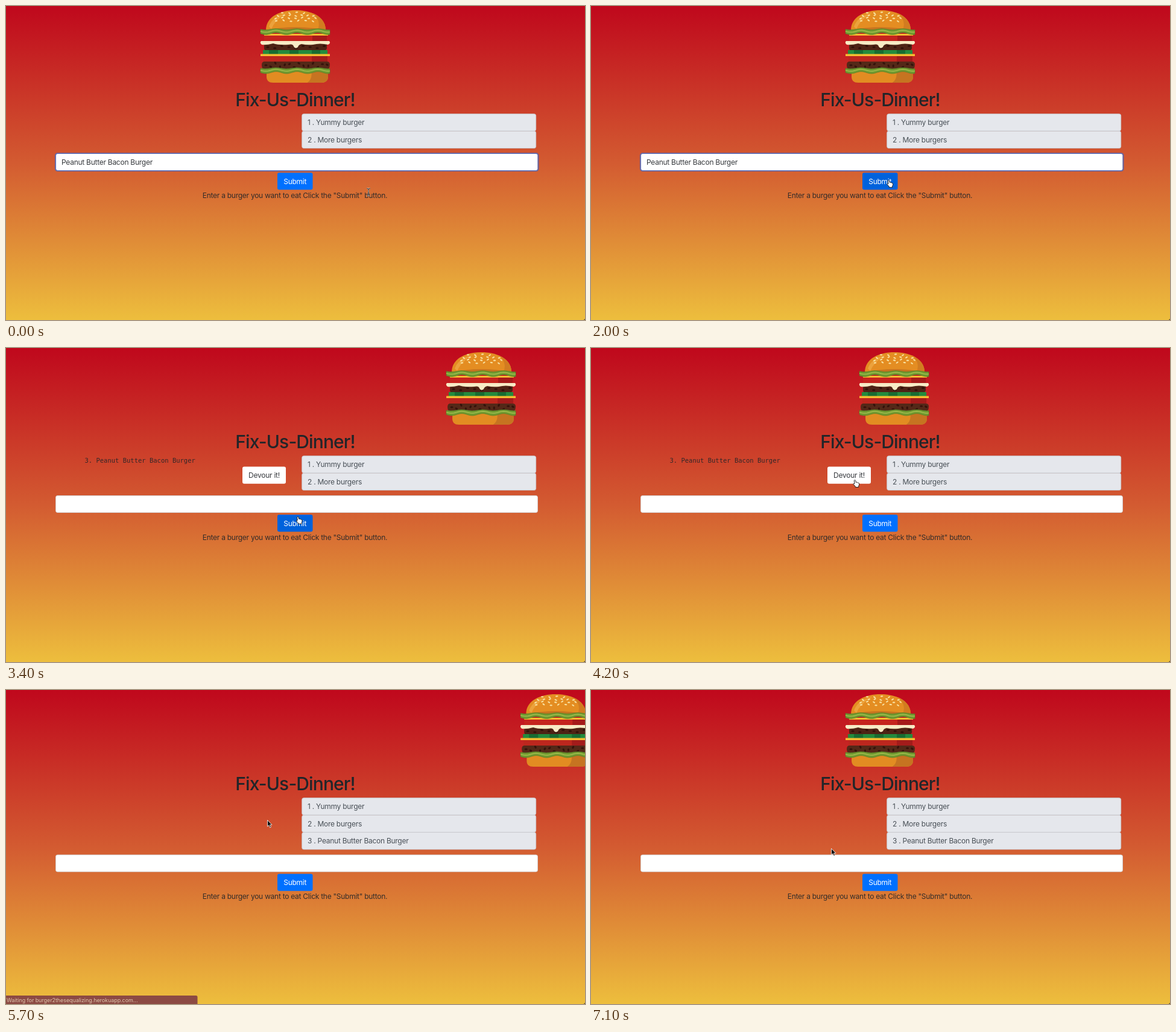
These frames come from a looping animation (960x520 px, 7200 ms). An HTML page:

```html
<!DOCTYPE html>
<html lang="en">
<head>
<meta charset="utf-8">
<title>Burger list</title>
<style>
  html, body { margin: 0; width: 100%; height: 100%; overflow: hidden; }
  svg { display: block; width: 100vw; height: 100vh; }
  text { font-family: Inter, "Open Sans", sans-serif; font-size: 12px; letter-spacing: -.022em; fill: #212529; fill-opacity: .9; }
  .title { font-size: 30px; font-weight: 500; letter-spacing: -.03em; fill-opacity: 1; }
  .mono { font-family: "DejaVu Sans Mono", monospace; font-size: 10.5px; letter-spacing: 0; }
  .item rect { fill: #e5e7ec; stroke: #c6cad1; stroke-width: .8; }
  .item text { fill: #495057; fill-opacity: 1; }
  .mid { text-anchor: middle; }
  .ring { fill: none; stroke: #4a62b8; stroke-opacity: .75; stroke-width: 2.2; }
</style>
</head>
<body>
<svg viewBox="0 0 960 520" preserveAspectRatio="none">
  <defs>
    <linearGradient id="sky" x2="0" y2="1">
      <stop offset="0" stop-color="#c0081c"/>
      <stop offset=".02" stop-color="#c00b1d"/>
      <stop offset=".5" stop-color="#d35b31"/>
      <stop offset="1" stop-color="#edbe3d"/>
    </linearGradient>
    <clipPath id="dome"><path d="M431 40C431 17 455 7 480 7S530 17 530 40Z"/></clipPath>
    <clipPath id="base"><path d="M432 108H534V117Q534 127 522 127H443Q432 127 432 117Z"/></clipPath>
  </defs>
  <rect width="960" height="520" fill="url(#sky)"/>
  <path d="M960 517V520H957Q960 520 960 517Z" fill="#222"/>

  <g id="burger">
    <g clip-path="url(#dome)">
      <rect x="430" y="6" width="102" height="36" fill="#e48d22"/>
      <path d="M500 6Q526 20 516 42H532V6Z" fill="#d27c20"/>
      <path d="M436 34Q442 17 466 11Q446 23 440 38Z" fill="#eca23c"/>
      <path d="M431 40Q480 30 530 40Z" fill="#c87520"/>
    </g>
    <g id="seeds" fill="#f8e2a2"/>
    <path d="M428 46H534V49H428Z" fill="#f5bb31"/>
    <path d="M428 49H532V58H428Z" fill="#c5241e"/>
    <path d="M508 49H532V58H508Z" fill="#a51a1a"/>
    <path d="M428 62Q480 58 532 62V70Q531 74 526 74H433Q428 74 428 70Z" fill="#4e2315"/>
    <g id="spotsA" fill="#301009"/>
    <path d="M423 58H536Q539 62 534 64Q520 61 509 64Q499 65 490 63Q485 64 484 68Q480 72 477 67Q476 62 468 64Q452 65 443 62Q432 65 424 64Q420 61 423 58Z" fill="#f8ebc5"/>
    <path d="M426 73H533V80H426Z" fill="#238b3d"/>
    <path d="M436 73H451V80H436ZM470 73H485V80H470ZM507 73H521V80H507Z" fill="#176c32"/>
    <path d="M422 79.5H537V83H422Z" fill="#f6bd31"/>
    <path d="M427 83H533V92H427Z" fill="#bd271e"/>
    <path d="M507 83H533V92H507Z" fill="#a31c1b"/>
    <path d="M428 92H532Q537 92 537 97Q537 105 530 106H430Q424 105 424 98Q424 92 428 92Z" fill="#542818"/>
    <g id="spotsB" fill="#34120b"/>
    <g clip-path="url(#base)">
      <rect x="430" y="107" width="106" height="21" fill="#e28c22"/>
      <path d="M506 107H536V128H498Q509 122 506 107Z" fill="#c67421"/>
    </g>
    <g id="leaves"/>
  </g>

  <g id="page">
    <text class="title mid" x="479.5" y="165.5">Fix-Us-Dinner!</text>
    <g id="items"></g>
    <g id="pending">
      <text class="mono" x="130.5" y="189.5">3. Peanut Butter Bacon Burger</text>
      <rect x="392" y="196.5" width="72" height="28.3" rx="3" fill="#fff"/>
      <text class="mid" x="428" y="215">Devour it!</text>
    </g>
    <g id="form">
      <rect x="82.5" y="244.5" width="799" height="28" rx="3" fill="#fff" stroke="#ced4da" stroke-width=".8"/>
      <rect id="inputRing" class="ring" x="82" y="244" width="800.5" height="29" rx="3.5"/>
      <text id="typed" x="92" y="263">Peanut Butter Bacon Burger</text>
      <rect id="button" x="450" y="276" width="58.5" height="28.3" rx="3"/>
      <rect id="buttonRing" class="ring" x="449" y="275" width="60.5" height="30.3" rx="4"/>
      <text class="mid" x="479.2" y="294.5" style="fill:#fff;fill-opacity:1">Submit</text>
      <text class="mid" x="479" y="317.7">Enter a burger you want to eat Click the "Submit" button.</text>
    </g>
  </g>

  <g id="status">
    <path d="M0 506H315Q317.500 506 317.500 508.500V520H0Z" fill="#8c4a43"/>
    <text x="1" y="516.5" style="font-size:9px;letter-spacing:-.07px;fill:#e0c6ae;fill-opacity:1">Waiting for burger2thesequalizing.herokuapp.com...</text>
  </g>

  <g id="cursor" stroke-linejoin="round">
    <g id="beam" fill="none">
      <path d="M-3 -6Q0 -6 0 -4Q0 -6 3 -6M0 -4V4M-3 6Q0 6 0 4Q0 6 3 6M-1.500 2H1.500" stroke="#fff" stroke-opacity=".7" stroke-width="2"/>
      <path d="M-3 -6Q0 -6 0 -4Q0 -6 3 -6M0 -4V4M-3 6Q0 6 0 4Q0 6 3 6M-1.500 2H1.500" stroke="#222"/>
    </g>
    <path id="arrow" d="M0 0V10.500L2.400 8.400L4.200 12.300L6 11.500L4.300 7.700H7.500Z" fill="#111" stroke="#fff" stroke-width=".8"/>
    <path id="hand" d="M-1.200 .8Q0 -.8 1.100 .8L1.800 4Q3 3.200 3.700 4.300Q5 3.700 5.500 4.900Q7 4.700 7.200 6.200Q7.400 8.500 6.200 10V12H.8V10.700L-2.700 6.800Q-2.500 5.200 -.5 6.300Z" fill="#fff" stroke="#111" stroke-width=".9"/>
  </g>
</svg>
<script>
const LOOP = 7200, STEP = 100;
const CLICK = 2400, ADDED = 3100, EATEN = 5100, LOADED = 5700;
const ROW = 28.5, NO_IMAGE = -114.5;
const $ = id => document.getElementById(id);
const show = (id, on) => $(id).setAttribute('visibility', on ? 'visible' : 'hidden');
const move = (id, x, y) => $(id).setAttribute('transform', `translate(${x} ${y})`);
const inside = (p, x, y, w, h) => p.x >= x && p.x <= x + w && p.y >= y && p.y <= y + h;

function dots(id, n, place) {
  let out = '';
  for (let i = 0; i < n; i++) {
    const [x, y, rx, ry, a] = place(i);
    out += `<ellipse rx="${rx}" ry="${ry}" transform="translate(${x} ${y}) rotate(${a})"/>`;
  }
  $(id).innerHTML = out;
}

// Seeds lie in four rows that widen toward the rim.
const rows = [[4, 458, 12, 11.3], [7, 451, 9.8, 15.7], [7, 447, 11, 20], [6, 448, 12.2, 24.5]];
const seeds = rows.flatMap(([n, x, gap, y], r) =>
  Array.from({ length: n }, (_, i) => [x + i * gap, y + Math.sin(i * 2.3 + r) * .9, 2.3, 1.1, 35 * Math.sin(i * 1.7 + r * 2)]));
dots('seeds', seeds.length, i => seeds[i]);
dots('spotsA', 9, i => [434 + i * 11.7, 68 + 2 * Math.sin(i * 2.1), 2.6, 1.5, 0]);
dots('spotsB', 14, i => [431 + i * 7.8, 98 + 3.5 * Math.sin(i * 2.4), 2.5, 1.6, i * 30]);

function leaf(y) {
  let top = '', low = '', vein = '';
  for (let x = 422; x <= 537; x += 2.5) {
    const w = Math.sin((x - 422) / 5.5);
    top += `${x} ${y + w * .9} `;
    low = `${x} ${y + 7.3 + w * 1.7} ` + low;
    vein += `${x} ${y + 3.4 + w * 1.5} `;
  }
  return `<polygon points="${top}${low}" fill="#70992f" stroke="#4d7925" stroke-width=".6"/>` +
    `<polyline points="${vein}" fill="none" stroke="#9abb4c" stroke-width="1.8"/>`;
}
$('leaves').innerHTML = leaf(38.5) + leaf(103);

$('items').innerHTML = ['Yummy burger', 'More burgers', 'Peanut Butter Bacon Burger'].map((name, i) =>
  `<g class="item" id="item${i}" transform="translate(0 ${i * ROW})">` +
  `<rect x="490.7" y="178.700" width="388" height="28.3" rx="3"/>` +
  `<text x="500" y="197.2">${i + 1} . ${name}</text></g>`).join('');

// CSS "ease": cubic-bezier(.25, .1, .25, 1)
function ease(p) {
  if (p <= 0) return 0;
  if (p >= 1) return 1;
  let lo = 0, hi = 1;
  for (let i = 0; i < 24; i++) {
    const s = (lo + hi) / 2;
    if (.75 * s * (1 - s) + s ** 3 < p) lo = s; else hi = s;
  }
  return .3 * lo * (1 - lo) ** 2 + 3 * lo * lo * (1 - lo) + lo ** 3;
}

// A shrinking left margin pushes the centred picture in from the right.
function slide(t) {
  if (t < ADDED) return 0;
  const start = t < EATEN ? 3145 : 5624;
  const margin = 798 * (1 - ease((t - start) / 1500));
  return Math.max(margin / 2, margin - 340);
}

const path = [
  [0, 601, 308], [400, 601, 308], [1200, 575.5, 296.5], [2100, 490.500, 288], [3200, 490.5, 288],
  [4100, 437.5, 218.5], [4900, 437.5, 218.5], [5300, 433.5, 215.5], [5700, 433.5, 215.5],
  [6300, 411.5, 238.5], [7000, 398.5, 262.5], [LOOP, 398.5, 262.5]
];
function pointer(t) {
  const i = path.findIndex(k => k[0] > t);
  const [t0, x0, y0] = path[i - 1], [t1, x1, y1] = path[i];
  const u = (t - t0) / (t1 - t0), s = u * u * (3 - 2 * u);
  return { x: x0 + (x1 - x0) * s, y: y0 + (y1 - y0) * s };
}

function render(t) {
  const eaten = t >= EATEN, blank = eaten && t < LOADED;
  const pending = t >= ADDED && !eaten;
  show('burger', !blank);
  move('burger', slide(t), 0);
  move('page', 0, blank ? NO_IMAGE : 0);
  move('form', 0, eaten ? ROW : 0);
  show('item2', eaten);
  show('pending', pending);
  show('typed', t < ADDED);
  show('inputRing', t < CLICK);
  show('status', t >= 5000 && t < 5800);

  const p = pointer(t);
  const overSubmit = !eaten && inside(p, 450, 276, 58.5, 28.3);
  const pressed = t >= CLICK && t < ADDED;
  show('buttonRing', pressed);
  $('button').setAttribute('fill', pressed ? '#0056cf' : overSubmit ? '#0062dc' : '#0070ff');

  const hand = overSubmit || blank || pending && inside(p, 392, 196.5, 72, 28.3);
  const beam = !hand && t < ADDED && p.y > 303;
  show('hand', hand);
  show('beam', beam);
  show('arrow', !hand && !beam);
  move('cursor', p.x, p.y);
}

const begin = performance.now();
function tick() {
  const t = (performance.now() - begin) % LOOP;
  render(Math.floor(t / STEP) * STEP);
  requestAnimationFrame(tick);
}
render(0);
requestAnimationFrame(tick);
</script>
</body>
</html>
```
